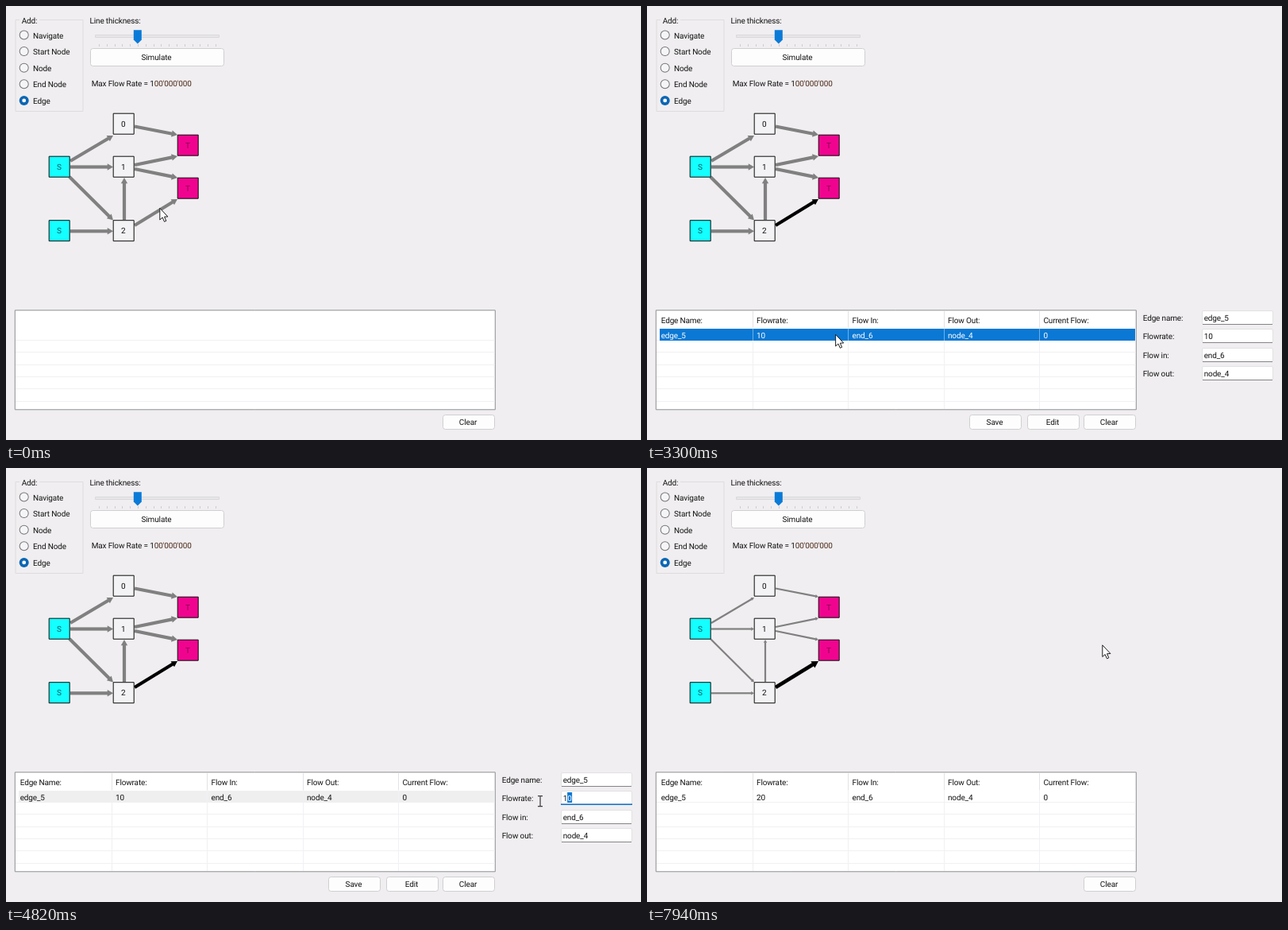
An HTML page with a canvas that plays this animation: 800 px wide and 546 px high, repeating every 8.45 s.

```html
<!DOCTYPE html>
<html lang="en">
<head>
<meta charset="utf-8">
<title>Flow network editor</title>
<style>
  html, body { margin: 0; width: 100%; height: 100%; overflow: hidden; background: #f0eef0; }
  canvas { display: block; width: 800px; height: 546px; }
</style>
</head>
<body>
<canvas id="stage" width="800" height="546"></canvas>
<script>
const ctx = document.getElementById('stage').getContext('2d');
const LOOP = 8450;
const BG = '#f0eef0', INK = '#141414', BLUE = '#0a78d4';

// Moments at which the interface changes
const PICK = 910, EDIT = 3090, FOCUS = 4560, SEL_ONE = 4700, SEL_ALL = 4880;
const RELEASE = 5300, TYPE_2 = 6700, TYPE_0 = 6800, SAVE = 7330, WAKE = 7820;

const smooth = k => k * k * (3 - 2 * k);
const easeIn = k => k * k;
const easeOut = k => k * (2 - k);

// Pointer path: time, x, y, easing towards this point
const PATH = [
  [0, 193.5, 254], [120, 193.5, 254], [180, 193.5, 255.5, smooth],
  [2210, 193.5, 255.5], [2240, 193.5, 260, smooth], [2730, 236.5, 413, smooth],
  [3270, 236.5, 413], [3910, 588, 396, easeIn], [4350, 713, 416, easeOut],
  [FOCUS, 713, 416], [4820, 674, 419, easeIn], [4940, 616, 432, easeOut],
  [RELEASE, 612, 434, smooth], [5610, 642, 257.5, smooth],
  [WAKE, 642, 257.5], [7940, 573.5, 222.5, smooth], [LOOP, 573.5, 222.5]
];

const COLS = [133, 253.5, 374, 494.5, 615];
const HEADS = ['Edge Name:', 'Flowrate:', 'Flow In:', 'Flow Out:', 'Current Flow:'];
const FIELDS = ['Edge name:', 'Flowrate:', 'Flow in:', 'Flow out:'];

const NODES = [
  ['S', 54, 189], ['S', 54, 269.5], ['0', 135, 135], ['1', 135, 189],
  ['2', 135, 269.5], ['T', 216, 162], ['T', 216, 216]
];
const SKIN = { S: ['#14ffff', '#075c66'], T: ['#f0048f', '#860a50'] };

// The last edge is the one being edited
const EDGES = [
  [81, 195, 135, 163], [81, 202.5, 135, 202.5], [80, 215, 135, 269.5],
  [81, 283.3, 135, 283.3], [149, 269, 149, 216], [162, 151.5, 216, 162],
  [162, 200, 216, 189], [162, 205, 216, 216], [162, 276, 216, 243]
];

function pointerAt(t) {
  let i = 1;
  while (i < PATH.length - 1 && t >= PATH[i][0]) i++;
  const [t0, x0, y0] = PATH[i - 1], [t1, x1, y1, ease = smooth] = PATH[i];
  const k = ease(Math.min(1, (t - t0) / (t1 - t0)));
  return { x: x0 + (x1 - x0) * k, y: y0 + (y1 - y0) * k };
}

function text(s, x, cy, color = INK, align = 'left') {
  ctx.fillStyle = color;
  ctx.textAlign = align;
  ctx.fillText(s, x, cy + 3.6);
}

function fill(x, y, w, h, color) {
  ctx.fillStyle = color;
  ctx.fillRect(x, y, w, h);
}

function box(x, y, w, h, inside, border, r = 0) {
  ctx.beginPath();
  ctx.roundRect(x + 0.5, y + 0.5, w - 1, h - 1, r);
  ctx.lineWidth = 1;
  if (inside) { ctx.fillStyle = inside; ctx.fill(); }
  ctx.strokeStyle = border;
  ctx.stroke();
}

function disc(x, y, r, color) {
  ctx.beginPath();
  ctx.arc(x, y, r, 0, Math.PI * 2);
  ctx.fillStyle = color;
  ctx.fill();
}

function shape(points, color) {
  ctx.beginPath();
  points.forEach(([x, y]) => ctx.lineTo(x, y));
  ctx.closePath();
  ctx.fillStyle = color;
  ctx.fill();
}

function button(label, x, y, w, h) {
  box(x, y, w, h, '#fdfdfd', '#cfcfd1', 3);
  text(label, x + w / 2 - 1, y + h / 2, INK, 'center');
}

function drawOptions() {
  box(11.5, 17, 86, 116, null, '#dddcde');
  fill(17, 15, 25, 5, BG);
  text('Add:', 19.7, 18);
  ['Navigate', 'Start Node', 'Node', 'End Node', 'Edge'].forEach((label, i) => {
    const y = 36.5 + i * 20.6;
    if (i === 4) {
      disc(22.7, y, 6, '#0a66b4');
      disc(22.7, y, 2.4, '#fff');
    } else {
      disc(22.7, y, 6, '#747476');
      disc(22.7, y, 5, '#f5f4f6');
    }
    text(label, 34, y + 0.5);
  });
}

function drawControls() {
  text('Line thickness:', 105.5, 18);
  box(112, 36, 157, 4, '#e8e7e8', '#d9d8da');
  for (let i = 0; i < 16; i++) fill(Math.round(117 + i * 9.8), 48, 1, 3, '#cdccce');
  shape([[160.8, 30.3], [170.8, 30.3], [170.8, 42.5], [165.8, 47.5], [160.8, 42.5]], '#0a7ad8');
  button('Simulate', 106, 53, 169, 23);
  const lead = 'Max Flow Rate = 1';
  text(lead, 107.7, 97);
  text("00'000'000", 107.7 + ctx.measureText(lead).width, 97, '#4c2a1a');
}

function drawEdge([x0, y0, x1, y1], width, color) {
  const a = Math.atan2(y1 - y0, x1 - x0);
  const len = Math.hypot(x1 - x0, y1 - y0), head = width * 1.73;
  ctx.save();
  ctx.translate(x0, y0);
  ctx.rotate(a);
  fill(0, -width / 2, len - head + 0.5, width, color);
  shape([[len, 0], [len - head, -width], [len - head, width]], color);
  ctx.restore();
}

function drawGraph(t) {
  const thin = t >= SAVE;
  EDGES.forEach((e, i) => {
    const own = i === EDGES.length - 1;
    const width = own ? (thin ? 4.8 : 4.2) : (thin ? 2.2 : 4.2);
    drawEdge(e, width, own && t >= PICK ? '#000' : '#808080');
  });
  NODES.forEach(([name, x, y]) => {
    const [paint, ink] = SKIN[name] || ['#f3f2f4', INK];
    box(x - 0.3, y - 0.3, 27, 27, paint, '#0c0c0c');
    text(name, x + 12.8, y + 13, ink, 'center');
  });
}

function drawTable(t, p) {
  box(10.8, 382.3, 606, 126, '#fff', '#8e8f93');
  for (let i = 0; i < 6; i++) fill(12, Math.round(420 + i * 15.3), 604, 1, '#f1f0f2');
  if (t < PICK) return;

  const hot = t >= EDIT && t < FOCUS;
  const over = p.y >= 384 && p.y < 405 ? COLS.findIndex(x => p.x < x) : -1;
  if (over >= 0) {
    const x0 = over ? COLS[over - 1] : 12;
    fill(x0, 384, COLS[over] - x0, 21, '#d9ebf9');
  }
  if (t < SAVE) fill(16, 406, 599, 15, hot ? BLUE : '#f0eff0');
  COLS.forEach((x, i) => {
    x = Math.floor(x);
    fill(x, 384, 1, 21, '#e3e2e4');
    if (i < 4) {
      fill(x, 405, 1, 102, '#f1f0f2');
      if (hot) fill(x, 406, 1, 15, '#6fb0e6');
    }
  });
  const row = ['edge_5', t < SAVE ? '10' : '20', 'end_6', 'node_4', '0'];
  HEADS.forEach((head, i) => {
    const x = i ? COLS[i - 1] + 5 : 17.7;
    text(head, x, 395);
    text(row[i], x, 414, hot ? '#fff' : INK);
  });
}

function drawFields(t) {
  const rate = t < TYPE_2 ? '10' : t < TYPE_0 ? '2' : '20';
  const values = ['edge_5', rate, 'end_6', 'node_4'];
  FIELDS.forEach((label, i) => {
    const y = Math.round(383 + i * 23.3), cy = y + 9;
    const focus = i === 1 && t >= FOCUS;
    text(label, 624.7, cy);
    box(699, y, 90, 18, '#fff', '#e2e1e3', 1.5);
    if (focus) fill(699, y + 16.4, 90, 1.6, '#1873c4');
    else fill(700, y + 17, 88, 1, '#858587');
    text(values[i], 701.7, cy);
    if (focus) drawSelection(t, rate, y, cy);
  });
}

function drawSelection(t, rate, y, cy) {
  const from = t >= TYPE_2 || t < SEL_ONE ? 2 : t < SEL_ALL ? 1 : 0;
  const x = 701.7 + ctx.measureText(rate.slice(0, from)).width;
  const rest = rate.slice(from);
  if (!rest) {
    fill(Math.round(x), y + 3, 1, 12, '#000');
    return;
  }
  fill(x, y + 2, ctx.measureText(rest).width + 0.5, 13, BLUE);
  text(rest, x, cy, '#fff');
}

function drawPointer(t, { x, y }) {
  if (t >= TYPE_2 && t < WAKE) return;
  const beam = t >= FOCUS ? t < RELEASE : x >= 699 && y >= 406;
  ctx.save();
  ctx.translate(x, y);
  ctx.lineWidth = 1;
  if (beam) {
    fill(-0.5, -6, 1, 12, '#111');
    fill(-3, -7, 6, 1, '#111');
    fill(-3, 6, 6, 1, '#111');
  } else {
    ctx.lineJoin = 'round';
    shape([[0.3, 0.3], [0.3, 15], [3.6, 12], [6, 17.3], [8.3, 16.3], [6, 11.2], [10.4, 11]], '#fff');
    ctx.strokeStyle = '#1c1c1c';
    ctx.stroke();
  }
  ctx.restore();
}

function draw(t) {
  const p = pointerAt(t);
  const editing = t >= EDIT && t < SAVE;
  ctx.font = '10px Roboto, "Open Sans", sans-serif';
  ctx.letterSpacing = '-0.15px';
  ctx.textRendering = 'geometricPrecision';
  fill(0, 0, 800, 546, BG);
  drawOptions();
  drawControls();
  drawGraph(t);
  drawTable(t, p);
  if (editing) {
    drawFields(t);
    button('Save', 406, 514, 66, 19);
  }
  if (t >= PICK && t < SAVE) button('Edit', 479, 514, 66, 19);
  button('Clear', 550, 514, 66, 19);
  drawPointer(t, p);
}

const start = performance.now();
function tick() {
  draw((performance.now() - start) % LOOP);
  requestAnimationFrame(tick);
}
tick();
</script>
</body>
</html>
```
